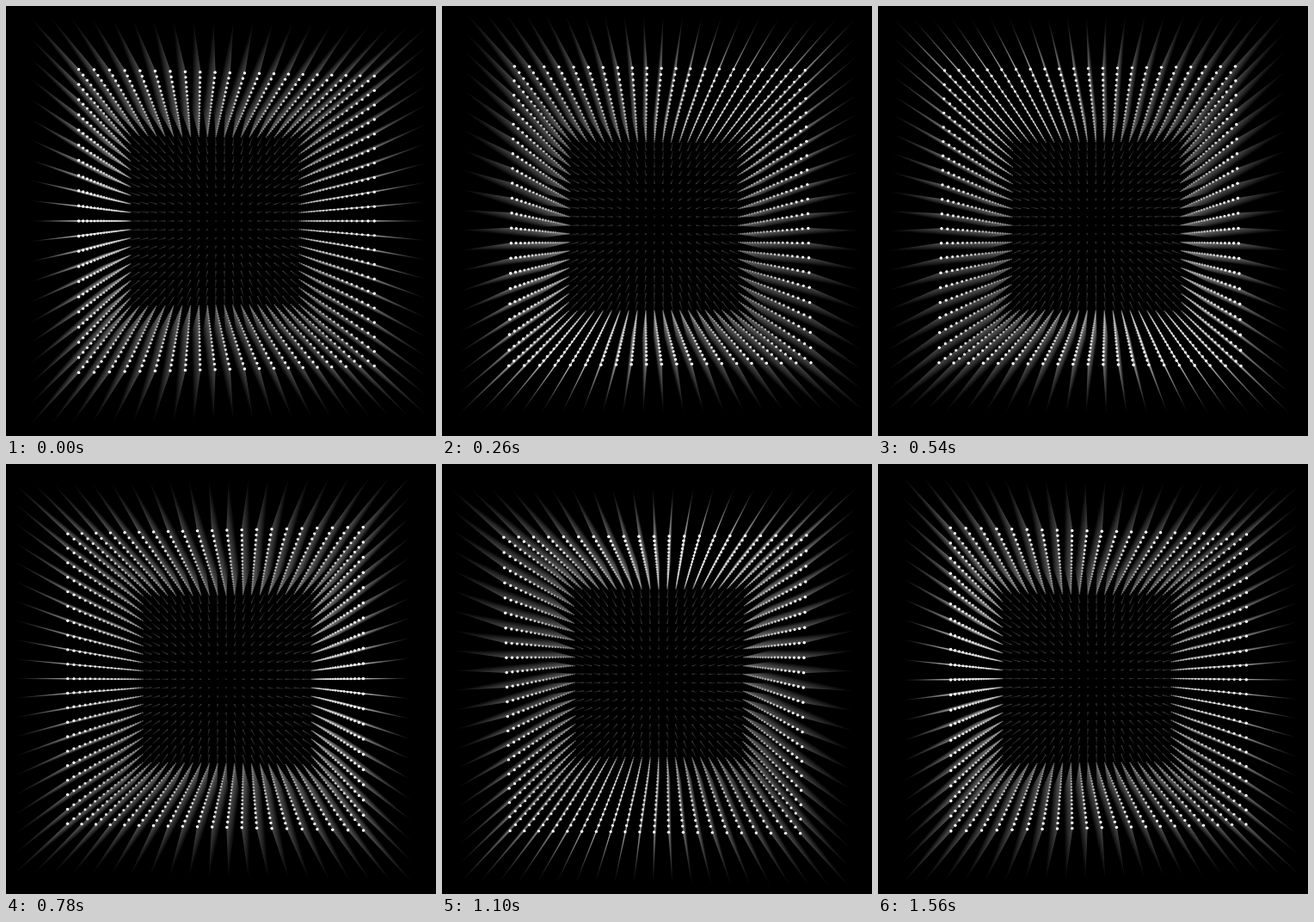
Recreate the animation shown at these times as an HTML page with a canvas. Size 500 by 500 pixels, loop 1580 ms.

```html
<!DOCTYPE html>
<html lang="en">
<head>
<meta charset="utf-8">
<title>Dot tunnel</title>
<style>
  html, body { margin: 0; width: 100%; height: 100%; overflow: hidden; background: #000; }
  canvas { display: block; width: 500px; height: 500px; }
</style>
</head>
<body>
<canvas id="stage" width="500" height="500"></canvas>
<script>
const SIZE = 500, CENTER = 250;
const LOOP = 1580, STEP = 20;
const HALF = 10;            // the box spans -HALF..HALF on every axis
const FOCAL = 457, DISTANCE = 36.5, TILT = 0.06;

// Ray reach is a share of the dot's distance from the centre.
const WALL_RAY = { strength: 78, reach: 0.335, falloff: 0.9 };
const BACK_RAY = { strength: 62, reach: 0.13, falloff: 0.8 };

const ctx = document.getElementById('stage').getContext('2d');
const image = ctx.createImageData(SIZE, SIZE);
const light = new Float32Array(SIZE * SIZE);

// An open box: four side walls and a dim back wall, ordered from back to front.
const dots = [];
for (let z = HALF; z >= -HALF; z--) {
  for (let y = -HALF; y <= HALF; y++) {
    for (let x = -HALF; x <= HALF; x++) {
      const wall = Math.max(Math.abs(x), Math.abs(y)) === HALF;
      if (!wall && z !== HALF) continue;
      const near = (HALF - z) / (2 * HALF);
      dots.push({
        x, y, z,
        alpha: wall ? 0.15 + 0.85 * near : 0.08,
        ray: wall ? WALL_RAY : BACK_RAY
      });
    }
  }
}

function project(dot, turnX, turnY) {
  const x = dot.x * Math.cos(turnX) - dot.z * Math.sin(turnX);
  const depth = dot.z * Math.cos(turnX) + dot.x * Math.sin(turnX);
  const y = dot.y * Math.cos(turnY) + depth * Math.sin(turnY);
  const z = depth * Math.cos(turnY) - dot.y * Math.sin(turnY);
  const scale = FOCAL / (DISTANCE + z);
  return { x: x * scale, y: y * scale, scale };
}

// Adds light at a fractional position, shared among four pixels.
function splat(x, y, amount) {
  const col = Math.floor(x), row = Math.floor(y);
  if (col < 0 || row < 0 || col >= SIZE - 1 || row >= SIZE - 1) return;
  const fx = x - col, fy = y - row, i = row * SIZE + col;
  light[i] += amount * (1 - fx) * (1 - fy);
  light[i + 1] += amount * fx * (1 - fy);
  light[i + SIZE] += amount * (1 - fx) * fy;
  light[i + SIZE + 1] += amount * fx * fy;
}

function castRay(point, { strength, reach, falloff }) {
  const length = Math.hypot(point.x, point.y) * reach;
  const steps = Math.ceil(length);
  for (let i = 0; i < steps; i++) {
    const u = i / steps, grow = 1 + reach * u;
    const amount = strength * Math.pow(1 - u, falloff) * length / steps;
    splat(CENTER - 0.5 + point.x * grow, CENTER - 0.5 + point.y * grow, amount);
  }
}

// Overlapping rays brighten towards a light grey instead of clipping.
const saturate = amount => 205 * (1 - Math.exp(-amount / 185));

function draw(time) {
  const angle = 2 * Math.PI * time / LOOP;
  const turnX = TILT * Math.cos(angle), turnY = TILT * Math.sin(angle);
  const points = dots.map(dot => project(dot, turnX, turnY));

  light.fill(0);
  points.forEach((point, i) => castRay(point, dots[i].ray));
  for (let i = 0; i < light.length; i++) {
    const p = i * 4;
    image.data[p] = image.data[p + 1] = image.data[p + 2] = saturate(light[i]);
    image.data[p + 3] = 255;
  }
  ctx.putImageData(image, 0, 0);

  ctx.fillStyle = '#fff';
  points.forEach((point, i) => {
    ctx.globalAlpha = dots[i].alpha;
    ctx.beginPath();
    ctx.arc(CENTER + point.x, CENTER + point.y, point.scale * 0.1, 0, 2 * Math.PI);
    ctx.fill();
  });
  ctx.globalAlpha = 1;
}

let shown = -1;
function tick() {
  const time = Math.floor(performance.now() % LOOP / STEP) * STEP;
  if (time !== shown) draw(shown = time);
  requestAnimationFrame(tick);
}
tick();
</script>
</body>
</html>
```
